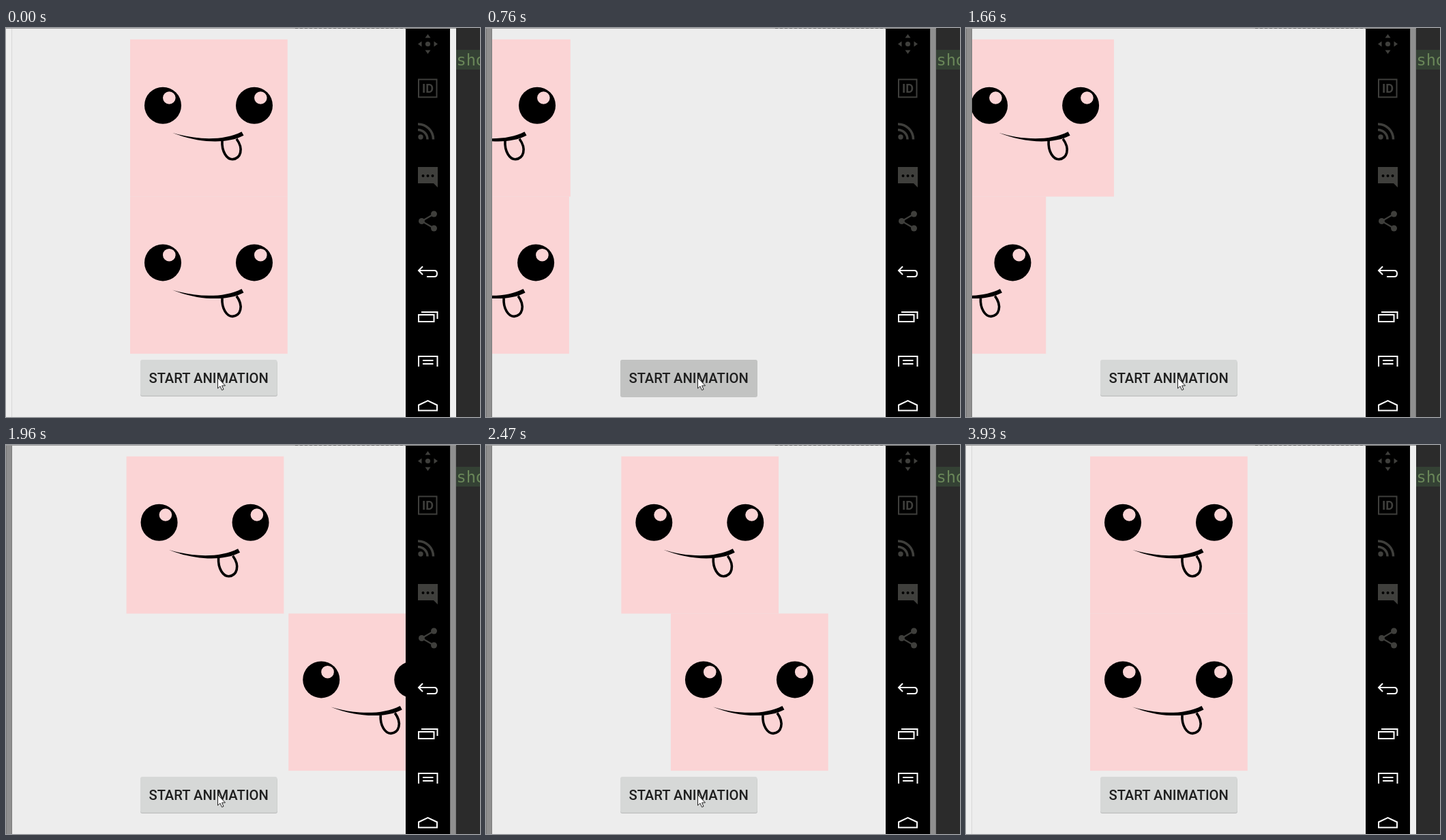
An HTML page that plays this animation: 695x571 px, repeating every 4030 ms.

```html
<!DOCTYPE html>
<html lang="en">
<head>
<meta charset="utf-8">
<title>Start animation</title>
<style>
html, body { margin: 0; width: 100%; height: 100%; overflow: hidden; background: #ededed; }
svg { display: block; width: 695px; height: 571px; }
.dim { fill: #3f3f3c; }
.dimLine { fill: none; stroke: #3f3f3c; }
.nav { fill: none; stroke: #fff; stroke-width: 2; }
</style>
</head>
<body>
<svg viewBox="0 0 695 571" xmlns="http://www.w3.org/2000/svg">
  <defs>
    <clipPath id="screen"><rect x="9" y="1" width="577" height="570"/></clipPath>
    <g id="face">
      <rect width="230.8" height="230.8" fill="#fbd4d5"/>
      <g id="eye">
        <circle cx="48" cy="97" r="27"/>
        <circle cx="57.3" cy="85.8" r="9.3" fill="#fbd4d5"/>
      </g>
      <use href="#eye" x="134"/>
      <path d="M62 137C93 147 136 150 163.500 135.500L166.500 141C140 155 96 151 62 137Z"/>
      <path d="M135 149C134 165 142 176 150 176C162 175 167 161 156 146" fill="none" stroke="#000" stroke-width="3.600"/>
    </g>
  </defs>

  <rect width="695" height="571" fill="#ededed"/>

  <g clip-path="url(#screen)">
    <use id="top" href="#face"/>
    <use id="bottom" href="#face"/>
  </g>

  <!-- button -->
  <rect id="shadow" x="197" y="489" width="201" height="52" rx="3" fill="#c3c4c4"/>
  <rect x="197" y="487" width="200.600" height="52.500" rx="3" fill="#d6d8d7"/>
  <rect id="press" x="197" y="487" width="201" height="55" rx="3" fill="#c2c3c2"/>
  <text x="297.200" y="521" text-anchor="middle" font-family="Roboto, sans-serif" font-weight="500" font-size="20.200" fill="#1f1f1f">START ANIMATION</text>

  <!-- window edges -->
  <g id="calm">
    <rect width="8" height="571" fill="#efefef"/>
    <rect x="8" width="1" height="571" fill="#d6d6d6"/>
    <rect x="651" width="9" height="571" fill="#efefef"/>
  </g>
  <g id="focus" fill="#8f8f8f">
    <rect width="9" height="571"/>
    <rect x="651" width="9" height="571"/>
    <path d="M.5 0V571M8.500 0V571M651.500 0V571M659.500 0V571" stroke="#7b7b7b"/>
  </g>
  <rect x="586" width="65" height="571"/>
  <rect x="660" width="35" height="571" fill="#2b2b2b"/>
  <rect x="660" y="32" width="35" height="29" fill="#344134"/>
  <text x="660.500" y="55" font-family="'DejaVu Sans Mono', monospace" font-size="23.500" fill="#6a8759">sho</text>
  <rect width="660" height="1" fill="#9a9a9a"/>
  <path d="M424 .5H586" stroke="#666" stroke-dasharray="4 3"/>

  <!-- emulator tools -->
  <g class="dim">
    <circle cx="618.500" cy="23.500" r="3.600"/>
    <path d="M618.500 9L622.500 14.500H614.500ZM618.500 38L622.500 32.500H614.500ZM604 23.500L609.500 19.500V27.500ZM633 23.500L627.500 19.500V27.500Z"/>
    <text x="618.500" y="95" text-anchor="middle" font-family="Roboto, sans-serif" font-weight="700" font-size="18">ID</text>
    <circle cx="608" cy="160" r="3.700"/>
    <path d="M604 204H633V234L627 228H604Z"/>
    <circle cx="627.500" cy="273" r="4.500"/>
    <circle cx="609.500" cy="283.500" r="4.500"/>
    <circle cx="627.500" cy="294" r="4.500"/>
  </g>
  <g class="dimLine">
    <rect x="605" y="75.500" width="26.500" height="26" stroke-width="2"/>
    <path d="M604 149.500A14 14 0 0 1 618 163.500M604 141A22.500 22.500 0 0 1 626.500 163.500" stroke-width="3.500"/>
    <path d="M627.500 273L609.500 283.500L627.500 294" stroke-width="2.200"/>
  </g>
  <g>
    <circle cx="611.500" cy="217" r="2"/>
    <circle cx="618.500" cy="217" r="2"/>
    <circle cx="625.500" cy="217" r="2"/>
  </g>
  <g class="nav">
    <path d="M611 350L605 356L611 362M605 356H628Q632 356 632 360.500T628 365H617"/>
    <path d="M605 421H627.500V431H605ZM609 417H632.500V427"/>
    <path d="M605 497V482H632.500V497M611 488H626.500M611 493H626.500"/>
    <path d="M605 561.500V553.500L618.500 547L632 553.500V561.500Z"/>
  </g>

  <path id="cursor" d="M310.500 513.500V529L314 525.800L316.500 531.500L319 530.500L316.600 525H321.500Z" fill="#fff" stroke="#222"/>
</svg>
<script>
const LOOP = 4030;
const STEPS = [0, 520, 640, 760, 880, 1030, 1150, 1270, 1420, 1540, 1660, 1810, 1960,
  2080, 2200, 2350, 2470, 2590, 2710, 2860, 3010, 3130, 3250, 3930];
const START = 726, DURATION = 2000, FROM = -288.5;
const el = id => document.getElementById(id);
const clamp = v => Math.max(0, Math.min(1, v));
const show = (id, on) => el(id).setAttribute('visibility', on ? 'visible' : 'hidden');
const move = (id, x, y) => el(id).setAttribute('transform', `translate(${x} ${y})`);

// Anticipate, then overshoot
function swing(t, s) {
  const u = 2 * t, v = u - 2;
  return u < 1
    ? 0.5 * u * u * ((s + 1) * u - s)
    : 0.5 * (v * v * ((s + 1) * v + s) + 2);
}

function offset(time, tension) {
  if (time < START) return 0;
  const age = time - START + Math.max(0, time - 1960) * 0.043;
  return FROM * (1 - swing(clamp(age / DURATION), tension));
}

function draw(time) {
  move('top', 182 + offset(time, 3), 16.7);
  move('bottom', 182 + offset(time, 15), 247.4);

  const active = time >= 520 && time < 3930;
  show('focus', active);
  show('calm', !active);
  const down = clamp((time - 400) / 300), up = clamp((time - 760) / 400);
  el('press').setAttribute('opacity', time < 520 ? 0 : down * (1 - up));

  const slide = clamp((time - 2860) / 270);
  move('cursor', 70 * slide, time < 2860 ? 0 : 8 + 42 * slide);
  show('cursor', time < 3250);
}

let origin;
function tick(now) {
  origin ??= now;
  const t = (now - origin) % LOOP;
  draw(STEPS.findLast(s => s <= t));
  requestAnimationFrame(tick);
}
draw(0);
requestAnimationFrame(tick);
</script>
</body>
</html>
```
